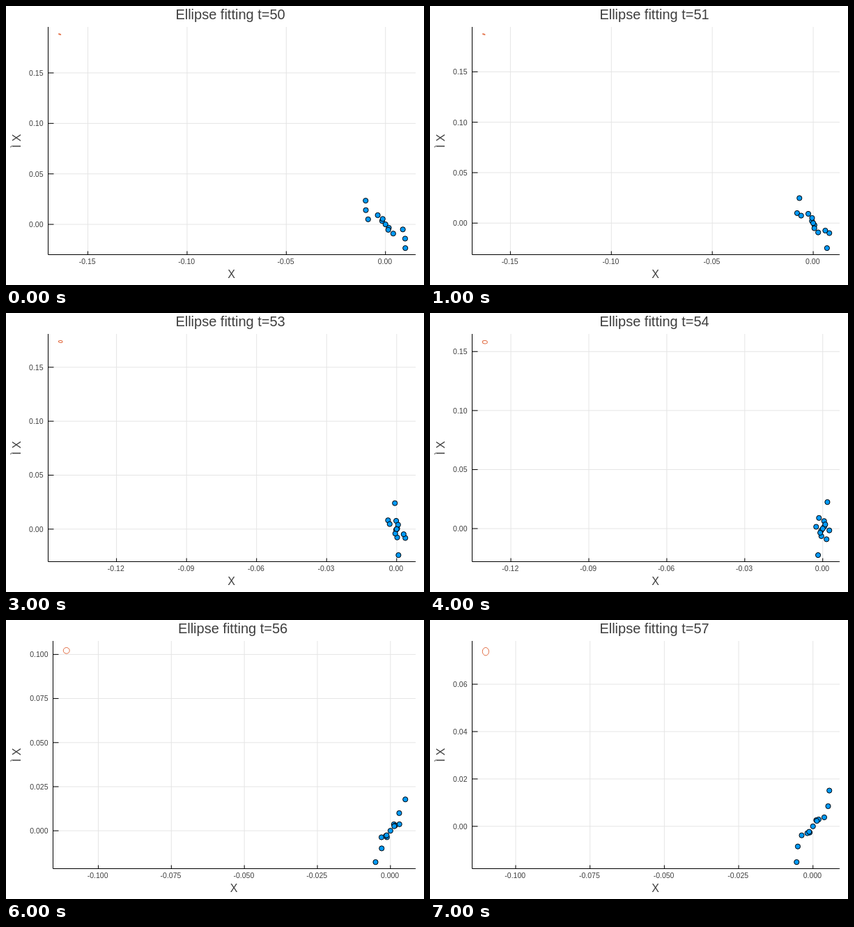
Animation of 600 by 400 pixels, one loop 8 s. Source, as an HTML page:

```html
<!DOCTYPE html>
<html lang="en">
<head>
<meta charset="utf-8">
<title>Ellipse fitting</title>
<style>
html, body { margin: 0; width: 100%; height: 100%; overflow: hidden; background: #fff; }
svg { display: block; }
text { font-family: "Liberation Sans", Arial, sans-serif; fill: #3f3f3f; }
</style>
</head>
<body>
<svg id="stage" width="600" height="400" viewBox="0 0 600 400"></svg>
<script>
const TOP = 30, BOTTOM = 356.5, RIGHT = 588, PAD = 14.8;
const FIRST = 50, COUNT = 8, HOLD = 1000;

// Smooth curve through a few key values (Lagrange)
const curve = (times, values) => t => values.reduce((sum, v, i) =>
  sum + times.reduce((w, k, j) => j === i ? w : w * (t - k) / (times[i] - k), v), 0);

// Data in thousandths; each point is mirrored through the origin
const track = (xs, ys) => {
  const keys = [0, 2, 5, 7], x = curve(keys, xs), y = curve(keys, ys);
  return t => [x(t), y(t)];
};
const tracks = [
  track([-10, -3.7, 3.8, 5.5], [23.5, 24.9, 20.3, 15.1]),
  track([-9.9, -5.9, .8, 5.1], [14.1, 8.2, 9.9, 8.5]),
  track([8.75, 4.1, 2.6, 3.8], [-5, -7, 1.6, 3.8]),
  track([-3.9, -1.2, 1, 1.1], [9.1, 8.7, 5, 2.6]),
  track([1.7, .2, 1.1, 1.9], [-3.4, -.7, 2.5, 2.9]),
  track([-1.4, .1, 1.2, 1.3], [5.4, 4.6, 3, 2.3])
];
const ovalKeys = [0, 2, 3, 5, 6, 7];
const ovalX = curve(ovalKeys, [-164.2, -156.1, -144, -117.9, -110.9, -110.1]);
const ovalY = curve(ovalKeys, [188.3, 182.6, 173.8, 133.4, 102.2, 73.8]);

const tickStep = span => [20, 25, 30].find(s => span < 5.6 * s) || 50;
const decimals = step => step % 10 ? 3 : 2;
const label = (v, step) => (v / 1000).toFixed(decimals(step));

const line = (x1, y1, x2, y2, color = "#000") =>
  `<line x1="${x1}" y1="${y1}" x2="${x2}" y2="${y2}" stroke="${color}"/>`;
const text = (str, x, y, size, anchor = "middle", extra = "") =>
  `<text x="${x}" y="${y}" font-size="${size}" text-anchor="${anchor}" ${extra}>${str}</text>`;
const dot = (x, y) =>
  `<circle cx="${x}" cy="${y}" r="3.6" fill="#009af9" stroke="#000"/>`;

function plot(t) {
  const pts = tracks.map(f => f(t));
  const maxX = Math.max(...pts.map(p => Math.abs(p[0])));
  const maxY = Math.max(...pts.map(p => Math.abs(p[1])));

  // The oval touches the padded top left corner, the outer dots the bottom right
  const rx = 3.2 - 1.4 * Math.cos(Math.PI * t / 7);
  const ry = .5 + 5.2 * (t / 7) ** 2;
  const tilt = Math.max(0, 20 - 4 * t);
  const cy = 39.5 + Math.max(ry, 1);
  const scaleY = (BOTTOM - 9.4 - cy) / (ovalY(t) + maxY);
  const stepY = tickStep((BOTTOM - TOP) / scaleY);
  const left = decimals(stepY) > 2 ? 67.5 : 60.5;
  const cx = left + PAD + rx;
  const scaleX = (RIGHT - PAD - cx) / (maxX - ovalX(t));
  const stepX = tickStep((RIGHT - left) / scaleX);

  const px = v => RIGHT - PAD + (v - maxX) * scaleX;
  const py = v => BOTTOM - 9.4 - (v + maxY) * scaleY;
  const center = (left + RIGHT) / 2;
  let grid = "", ticks = "", dots = "";

  for (let v = 0, x; (x = px(v)) > left; v -= stepX) {
    grid += line(x, TOP, x, BOTTOM, "#e5e5e5");
    ticks += line(x, BOTTOM, x, BOTTOM - 5) + text(label(v, stepX), x - .8, 370, 10.5);
  }
  for (let v = 0, y; (y = py(v)) > TOP; v += stepY) {
    grid += line(left, y, RIGHT, y, "#e5e5e5");
    ticks += line(left, y, left + 8, y) + text(label(v, stepY), left - 7, y + 3.9, 10.5, "end");
  }
  for (const [x, y] of pts) dots += dot(px(x), py(y)) + dot(px(-x), py(-y));
  dots += dot(px(0), py(0));

  return grid +
    line(left, BOTTOM, RIGHT, BOTTOM) + line(left, TOP, left, BOTTOM) + ticks + dots +
    `<ellipse cx="${cx}" cy="${cy}" rx="${rx}" ry="${ry}" fill="none" stroke="#e26f46" transform="rotate(${tilt} ${cx} ${cy})"/>` +
    text("Ellipse fitting t=" + (FIRST + t), center - 2.2, 19, 20) +
    text("X", center - .7, 390, 16) +
    text("Ì X", 0, 0, 16, "middle", 'transform="translate(20.5 193.4) rotate(-90)"');
}

const stage = document.getElementById("stage");
let shown = -1;

function tick() {
  const t = Math.floor(performance.now() / HOLD) % COUNT;
  if (t !== shown) stage.innerHTML = plot(shown = t);
  requestAnimationFrame(tick);
}
tick();
</script>
</body>
</html>
```
